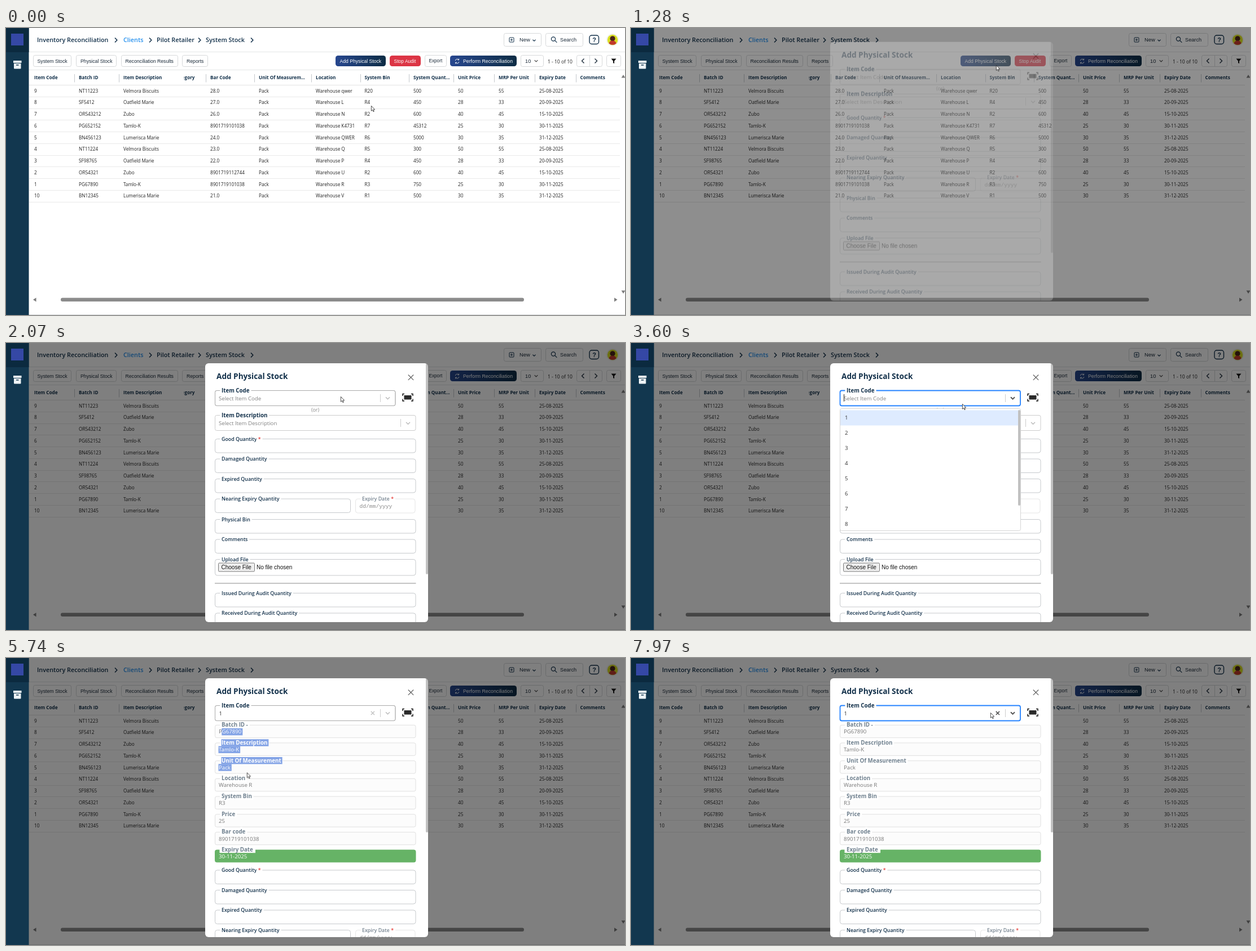
These frames come from a looping animation (1097x510 px, 8 s). An HTML page:

```html
<!DOCTYPE html>
<html lang="en">
<head>
<meta charset="utf-8">
<title>Inventory Reconciliation</title>
<style>
  html, body { margin: 0; width: 100%; height: 100%; overflow: hidden; background: #fff; }
  svg { display: block; width: 1097px; height: 510px; }
  text { white-space: pre; }
  .ui { font-family: "Open Sans", "Noto Sans", sans-serif; }
  .btn { font-family: "Liberation Sans", Arial, sans-serif; }
  .mono { font-family: "Liberation Mono", monospace; }
  .halo { stroke: #fff; stroke-width: 7px; stroke-linejoin: round; paint-order: stroke; }

  #shade { animation: shade 8s linear infinite; }
  @keyframes shade { 0%, 13.75% { opacity: 0 } 16.3%, 100% { opacity: .5 } }

  #modal { animation: enter 8s linear infinite; }
  @keyframes enter {
    0%, 15.3125% { opacity: 0; transform: translateY(-15px) }
    18.1875%, 100% { opacity: 1; transform: translateY(0) }
  }

  #pointer { animation: point 8s ease-in-out infinite; }
  @keyframes point {
    0%, .5% { transform: translate(647px, 138px) }
    10.5%, 17.5% { transform: translate(647px, 66px) }
    20.625% { transform: translate(642px, 77px) }
    25.875%, 38% { transform: translate(593px, 95px) }
    40.875%, 48.875% { transform: translate(587px, 108px) }
    52.375%, 61.375% { transform: translate(543px, 142px) }
    61.875% { transform: translate(513px, 151px) }
    67.25%, 70% { transform: translate(383px, 131px) }
    73.625%, 77% { transform: translate(475px, 283px) }
    82.75%, 95.75% { transform: translate(552px, 97px) }
    99.6%, 100% { transform: translate(637px, 97px) }
  }
</style>
</head>
<body>
<svg id="stage" viewBox="0 0 1097 510" xmlns="http://www.w3.org/2000/svg">
  <defs>
    <linearGradient id="navy"><stop stop-color="#27478f"/><stop offset="1" stop-color="#0d2c44"/></linearGradient>
    <clipPath id="card"><rect x="353" y="36" width="395" height="460" rx="6"/></clipPath>
    <clipPath id="list"><rect x="370" y="116" width="321" height="218" rx="3"/></clipPath>
    <clipPath id="cut"><rect x="315.500" y="78" width="30" height="22"/></clipPath>
  </defs>
</svg>
<script>
const NS = 'http://www.w3.org/2000/svg';
const stage = document.getElementById('stage');
const sheet = document.head.appendChild(document.createElement('style'));
const INK = '#12304a', BLUE = '#2684ff';

function add(parent, tag, attrs = {}) {
  const el = document.createElementNS(NS, tag);
  for (const k in attrs) el.setAttribute(k, attrs[k]);
  return parent.appendChild(el);
}
const group = (parent, attrs) => add(parent, 'g', attrs);
const box = (parent, x, y, width, height, fill, more) =>
  add(parent, 'rect', { x, y, width, height, fill, ...more });
const line = (parent, d, stroke, width = 1) =>
  add(parent, 'path', { d, stroke, 'stroke-width': width, fill: 'none' });
const shape = (parent, d, fill) => add(parent, 'path', { d, fill });

// y is the middle of the capitals
function label(parent, x, y, str, size, fill = '#222', weight = 400, cls = 'ui') {
  const el = add(parent, 'text', {
    x, y: y + size * .36, fill, class: cls, 'font-size': size, 'font-weight': weight
  });
  el.textContent = str;
  return el;
}

// Show an element only between two times of the loop
function during(el, from, to) {
  const name = `t${from}_${to}`;
  sheet.textContent += `@keyframes ${name} { 0% { visibility: hidden } ${from / 80}% { visibility: visible }
    ${to / 80}%, 100% { visibility: hidden } }\n`;
  el.style.animation = `${name} 8s step-end infinite`;
}

const chevron = (parent, x, y, color, w = 1.5, s = 3.5) =>
  line(parent, `M${x - s} ${y - s / 2}l${s} ${s} ${s} ${-s}`, color, w);

function outlined(parent, x, y, w, h, str, tx, size = 8.7) {
  box(parent, x + .5, y + .5, w - 1, h - 1, '#fff', { rx: 3, stroke: '#d6d8da' });
  if (str) label(parent, tx, y + h / 2, str, size, '#1c2b3a', 400, 'btn');
}

function filled(parent, x, w, fill, str, tx, size) {
  box(parent, x, 49, w, 19, fill, { rx: 4.5 });
  label(parent, tx, 58.5, str, size, '#fff', 400, 'btn');
}

function sidebar(g) {
  box(g, 0, 0, 40.5, 510, '#12374f');
  box(g, 0, 0, 40.5, 43, '#0b2a3f');
  box(g, 9, 10, 22, 21, '#3548a5');
  shape(g, 'M13 58h14.5v4H13zM14 63h12.5v8.5q0 1-1 1H15q-1 0-1-1z', '#eef3f6');
  box(g, 18, 65, 4.5, 1.5, '#12374f');
}

function topBar(g) {
  const crumbs = [[55, 'Inventory Reconciliation'], [208, 'Clients'], [267, 'Pilot Retailer'], [354, 'System Stock']];
  crumbs.forEach(([x, s], i) => label(g, x, 21, s, 10.8, i == 1 ? '#2490ee' : INK, 600));
  for (const x of [193, 254, 341, 434]) line(g, `M${x} 17.5l3.8 4-3.8 4`, INK, 1.5);
  line(g, 'M40 42.5H1097M40 74.5H1097', '#e3e5e7');

  outlined(g, 882, 9, 67, 24, 'New', 910, 9.4);
  box(g, 892, 17, 8, 8, 'none', { rx: 1, stroke: INK });
  line(g, 'M896 18.8v4.4M893.8 21h4.4', INK);
  chevron(g, 936, 22, INK, 1.1, 2.5);
  outlined(g, 956, 9, 67, 24, 'Search', 982, 9.2);
  add(g, 'circle', { cx: 970, cy: 19.5, r: 3.6, fill: 'none', stroke: INK, 'stroke-width': 1.2 });
  line(g, 'M972.7 22.2l3.6 3.6', INK, 1.2);
  box(g, 1034, 13, 16.5, 15.5, 'none', { rx: 4, stroke: INK, 'stroke-width': 1.4 });
  label(g, 1039.2, 21, '?', 11, INK, 700, 'btn');

  add(g, 'circle', { cx: 1075, cy: 21, r: 11, fill: '#f1f2ea' });
  add(g, 'circle', { cx: 1075, cy: 21, r: 9.2, fill: '#d9e021' });
  add(g, 'circle', { cx: 1075, cy: 18.8, r: 4.6, fill: '#4a2418' });
  shape(g, 'M1068.5 27.5q1-5 6.5-5t6.5 5q-6.5 5-13 0z', '#c23a2c');
}

function toolbar(g) {
  outlined(g, 48, 48, 68, 21, 'System Stock', 55.5);
  outlined(g, 124, 48, 72, 21, 'Physical Stock', 132);
  outlined(g, 204, 48, 101, 21, 'Reconciliation Results', 211.5);
  outlined(g, 312, 48, 46, 21, 'Reports', 320);
  filled(g, 584, 89, 'url(#navy)', 'Add Physical Stock', 591.5, 8.6);
  filled(g, 680, 55, '#dc3545', 'Stop Audit', 687.5, 8.5);
  outlined(g, 742, 48, 39, 21, 'Export', 749.5, 8.2);
  filled(g, 787, 118, 'url(#navy)', 'Perform Reconciliation', 810, 8.75);
  line(g, 'M796.3 58a3.4 3.4 0 0 1 6-1.6M802.6 54.5v2.3h-2.3M802.9 60a3.4 3.4 0 0 1-6 1.6M796.6 63.5v-2.3h2.3', '#fff', .9);
  outlined(g, 912, 48, 41, 21, '10', 920, 9.3);
  chevron(g, 939.5, 58.5, '#444', 1.1, 2.8);
  label(g, 960, 59.5, '1 - 10 of 10', 8.5);
  outlined(g, 1011, 48, 46, 21);
  line(g, 'M1034.5 48.5v20', '#d6d8da');
  line(g, 'M1024.5 54.5l-4 4 4 4M1043.5 54.5l4 4-4 4', '#1c2b3a', 1.4);
  outlined(g, 1064, 48, 26, 21);
  shape(g, 'M1072.5 54.5h9l-3.5 4.3v4.4l-2-1.3v-3.1z', '#111');
}

function table(g) {
  const cols = [50, 129, 208, 362, 448, 549, 635.5, 722, 801, 873, 945, 1017.5];
  const heads = ['Item Code', 'Batch ID', 'Item Description', 'Bar Code', 'Unit Of Measurem...', 'Location',
    'System Bin', 'System Quant...', 'Unit Price', 'MRP Per Unit', 'Expiry Date', 'Comments'];
  heads.forEach((s, i) => {
    label(g, cols[i], 88, s, 8.2, INK, 700);
    if (i) line(g, `M${Math.round(cols[i]) - 7.5} 82v14.5`, '#c4c8cc');
  });
  const category = label(group(g, { 'clip-path': 'url(#cut)' }), 334.5, 88, 'Category', 8.15, INK, 700);
  category.setAttribute('text-anchor', 'end');
  line(g, 'M41 101.5H1088', '#e4e4e4');

  const goods = [['Velmora Biscuits', 50, '25-08-2025'], ['Oatfield Marie', 28, '20-09-2025'], ['Zubo', 40, '15-10-2025'],
    ['Tamlo-K', 25, '30-11-2025'], ['Lumerisca Marie', 30, '31-12-2025']];
  const rows = ['9 NT11223 28.0 qwer R20 500', '8 SF5412 27.0 L R4 450', '7 OR543212 26.0 N R2 600',
    '6 PG652152 8901719101038 K4731 R7 45312', '5 BN456123 24.0 QWER R6 5000', '4 NT11224 23.0 Q R5 300',
    '3 SF98765 22.0 P R4 450', '2 OR54321 8901719112744 U R2 600', '1 PG67890 8901719101038 R R3 750',
    '10 BN12345 21.0 V R1 500'];
  rows.forEach((row, i) => {
    const [code, batch, bar, place, bin, count] = row.split(' ');
    const [name, price, date] = goods[i % 5];
    const y = 111.6 + 20.75 * i;
    [code, batch, name, bar, 'Pack', 'Warehouse ' + place, bin, count, price, price + 5, date]
      .forEach((s, c) => label(g, cols[c], y, s, 8.2));
    line(g, `M41 ${Math.round(y + 10.3) + .5}H1088`, '#e9e9e9');
  });

  box(g, 97, 479.5, 821, 6.5, '#8b8b8b', { rx: 3.2 });
  shape(g, 'M48 482.8l5.5-3.6v7.2zM1083.5 482.8l-5.5-3.6v7.2zM1094 83l3.5 5.5h-7zM1094 472l3.5-5.5h-7z', '#7d7d7d');
  line(g, 'M0 509.5H1097', '#d4d6d8');
}

function field(g, y, str, { x = 370.5, w = 355.5, h = 24.5, star, soft } = {}) {
  box(g, x, y, w, h, '#fff', { rx: 4, stroke: soft ? '#e6e6e6' : '#c6c9cc' });
  const el = label(g, x + 11.5, y, str, 8.85, soft ? '#74828f' : INK, 600, 'ui halo');
  if (star) add(el, 'tspan', { fill: '#e53935' }).textContent = ' *';
}

function commonFields(g) {
  field(g, 170.5, 'Good Quantity', { star: true });
  field(g, 206, 'Damaged Quantity');
  field(g, 241.5, 'Expired Quantity');
  field(g, 277, 'Nearing Expiry Quantity', { w: 240 });
  field(g, 277, 'Expiry Date', { x: 619.5, w: 105.5, h: 25, star: true, soft: true });
  label(g, 626.5, 290, 'dd/mm/yyyy', 9.65, '#8a8a8a', 400, 'mono');
  field(g, 313.5, 'Physical Bin');
  field(g, 349, 'Comments');
  field(g, 384.5, 'Upload File', { h: 28.5 });
  box(g, 376.5, 391, 64, 15, '#efefef', { rx: 1.5, stroke: '#777' });
  label(g, 381.5, 398.3, 'Choose File', 10, '#111', 400, 'btn');
  label(g, 444, 398.3, 'No file chosen', 10, '#111', 400, 'btn');
  box(g, 370, 426, 356.5, 2, '#c4c4c4');
  field(g, 444.5, 'Issued During Audit Quantity');
  field(g, 480, 'Received During Audit Quantity');
}

function plainForm(parent) {
  const g = group(parent);
  label(g, 541, 119, '(or)', 8.75, '#888');
  box(g, 370.5, 128.5, 355.5, 27, '#fff', { rx: 3, stroke: '#cbcbcb' });
  label(g, 382, 128, 'Item Description', 9.75, INK, 700, 'ui halo');
  label(g, 377, 143, 'Select Item Description', 9.65, '#808080');
  line(g, 'M699.5 135v14', '#ccc');
  chevron(g, 712.5, 142.5, '#bbb');
  commonFields(g);
  box(g, 744, 36, 4, 375, '#c1c1c1', { rx: 2 });
  return g;
}

function detailForm(parent) {
  const g = group(parent);
  const rows = [['Batch ID -', 'PG67890'], ['Item Description', 'Tamlo-K'], ['Unit Of Measurement', 'Pack'],
    ['Location', 'Warehouse R'], ['System Bin', 'R3'], ['Price', '25'], ['Bar code', '8901719101038'],
    ['Expiry Date', '30-11-2025']];
  const mark = (to, x, y, w, str, size, weight) => {
    box(to, x - .5, y - 6, w + 2.5, 12.5, '#84a4e6');
    label(to, x, y, str, size, '#fff', weight);
  };
  rows.forEach(([name, value], i) => {
    const y = 118.9 + 31.7 * i, last = i == 7;
    box(g, 370.5, y + .3, 355.5, last ? 21.7 : 22.5, last ? '#66b366' : '#fcfcfc',
      { rx: 3, stroke: last ? '#66b366' : '#e0e0e0' });
    if (last) box(g, 378.5, y - 6, 63.5, 11.5, '#fff');
    const head = label(g, 382, y - .3, name, 9.75, '#70818f', 700, last ? 'ui' : 'ui halo');
    const text = label(g, 377, y + 12, value, 9.65, last ? '#fff' : '#777');
    if (i > 5) return;

    // The drag starts after the first letter of the first value
    const hit = group(g), skip = i ? 0 : text.getSubStringLength(0, 1);
    if (i) mark(hit, 382, y - .3, head.getComputedTextLength(), name, 9.75, 700);
    mark(hit, 377 + skip, y + 12, text.getComputedTextLength() - skip, value.slice(i ? 0 : 1), 9.65, 400);
    during(hit, 5640 + 42 * i, 6860);
  });
  commonFields(group(g, { transform: 'translate(0 206.5)' }));
  box(g, 744, 36, 4, 274, '#c1c1c1', { rx: 2 });
  return g;
}

function picker(g) {
  const frame = (stroke, width) =>
    box(g, 370.5, 84.5, 319.5, 27, 'none', { rx: 3, stroke, 'stroke-width': width });
  box(g, 370.5, 84.5, 319.5, 27, '#fff', { rx: 3, stroke: '#cbcbcb' });
  during(frame('#aaa', 1), 1800, 3510);
  during(frame('#aaa', 1), 5600, 6860);
  label(g, 663.5, 98, '', 9);
  line(g, 'M663.5 91v14', '#ccc');
  chevron(g, 676.5, 98, '#bbb');

  const cross = 'M646.8 94.8l6.2 6.2M653 94.8l-6.2 6.2';
  during(line(g, cross, '#c4c4c4', 1.5), 5600, 6860);
  for (const [from, to] of [[3510, 5600], [6860, 8000]]) {
    during(frame(BLUE, 1.8), from, to);
    during(chevron(g, 676.5, 98, '#555', 1.8), from, to);
    during(line(g, cross, '#555', 1.7), Math.max(from, 4370), to);
  }
  label(g, 382, 84, 'Item Code', 9.75, INK, 700, 'ui halo');
  during(label(g, 377, 98.3, 'Select Item Code', 9.65, '#808080'), 0, 4370);
  during(label(g, 377.5, 98.3, '1', 9.65, '#333'), 4370, 8000);
  during(line(g, 'M377.5 91v13', '#222'), 3560, 3950);
  during(line(g, 'M377.5 91v13', '#222'), 6900, 7690);
}

function menu(parent, picked) {
  const g = group(parent);
  box(g, 370.5, 116.5, 320, 217, '#fff', { rx: 3, stroke: '#d5d5d5' });
  const list = group(g, { 'clip-path': 'url(#list)' });
  box(list, 371, 119.5, 319, 27, picked ? BLUE : '#deebff');
  for (let i = 0; i < 8; i++)
    label(list, 379, 133 + 27 * i, i + 1, 9.65, picked && !i ? '#fff' : '#333');
  box(g, 686, 119, 4, 170, '#c1c1c1', { rx: 2 });
  return g;
}

function modal(g) {
  const card = group(g, { 'clip-path': 'url(#card)' });
  box(card, 353, 36, 395, 460, '#fff');
  label(card, 373, 59.5, 'Add Physical Stock', 13.6, INK, 700);
  line(card, 'M712.8 56.5l9.4 9.4M722.2 56.5l-9.4 9.4', '#666', 1.3);
  line(card, 'M706 90.5h-3v3.5M718 90.5h3v3.5M706 103h-3v-3.5M718 103h3v-3.5', '#111', 1.4);
  box(card, 705.5, 93, 13, 7.5, '#2a2a2a');
  during(plainForm(card), 0, 4480);
  during(detailForm(card), 4480, 8000);
  picker(card);
  during(menu(card, false), 3560, 4370);
  during(menu(card, true), 6900, 7290);
}

topBar(stage);
toolbar(stage);
table(stage);
box(stage, 40, 0, 1057, 510, '#000', { id: 'shade' });
sidebar(stage);
modal(group(stage, { id: 'modal' }));
add(group(stage, { id: 'pointer' }), 'path', {
  d: 'M.4 .4V9.4L2.5 7.5 4 10.8 5.3 10.2 3.9 7H6.7Z', fill: '#fff', stroke: '#222', 'stroke-width': .8
});
</script>
</body>
</html>
```
